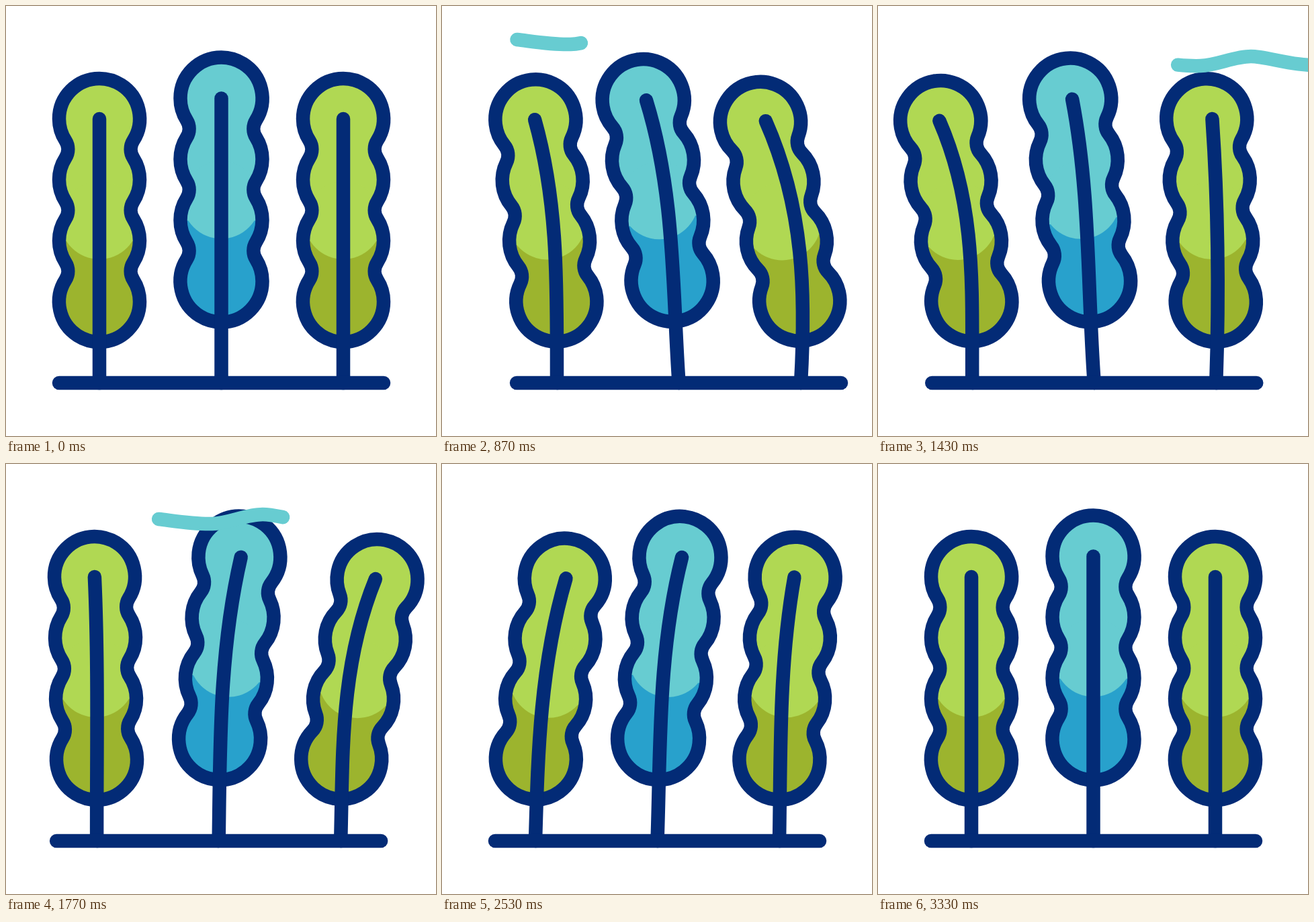
Animation of 640x640 px, one loop 3.43 s. Source, as an HTML page with a canvas:

```html
<!DOCTYPE html>
<html lang="en">
<head>
<meta charset="utf-8">
<title>Trees in the wind</title>
<style>
  html, body { margin: 0; height: 100%; overflow: hidden; background: #fff; }
  canvas { display: block; }
</style>
</head>
<body>
<canvas id="stage" width="640" height="640"></canvas>
<script>
const ctx = document.getElementById('stage').getContext('2d');
const LOOP = 3430, NAVY = '#032b76', TEAL = '#67ccd1';
const GROUND_Y = 561, STEP = 90.7, HEIGHT = 3 * STEP;
const WIND = new Path2D('M0 0C25 3 55 8 80 7S130-7 155-7S220 9 267 6');
const WIND_LENGTH = 272;

// Factors come in pairs: [leaning left, leaning right].
// low and high bend the trunk, top and drag move its tip; low, high and drag follow late.
const trees = [
  { x: 139, y: 440, r: 60, light: '#b0d853', dark: '#9cb42e',
    lean: [[270, 0], [1310, -50], [2270, 50], [3333, 0]],
    slide: [.02, .02], top: [1.06, 1.06], drag: [0, 0],
    low: [.02, .08], high: [-.16, .15] },
  { x: 320.5, y: 409.5, r: 61, light: TEAL, dark: '#28a1cc',
    lean: [[130, 0], [1150, -52], [2050, 52], [3190, 0]],
    slide: [.23, .05], top: [1.13, 1.13], drag: [0, 0],
    low: [.26, .13], high: [.14, .02] },
  { x: 502, y: 440, r: 60, light: '#b0d853', dark: '#9cb42e',
    lean: [[0, 0], [1080, -64], [1870, 58], [3040, 0]],
    slide: [.03, .02], top: [1.2, .97], drag: [-.33, 0],
    low: [-.14, .08], high: [-.1, -.03] }
];
const groundShift = [[0, 0], [667, 36], [1667, -4], [2500, 0]];

// Sine-eased value between key points [time, value].
function track(keys, t) {
  if (t <= keys[0][0]) return keys[0][1];
  for (let i = 1; i < keys.length; i++) {
    const [t0, v0] = keys[i - 1], [t1, v1] = keys[i];
    if (t < t1) return v0 + (v1 - v0) * (1 - Math.cos(Math.PI * (t - t0) / (t1 - t0))) / 2;
  }
  return keys[keys.length - 1][1];
}

const scaled = (value, pair) => value * pair[value < 0 ? 0 : 1];

// Four stacked lobes joined by fillets, centred on the lowest lobe.
function leafPath(r) {
  const fillet = 24, half = STEP / 2;
  const reach = Math.sqrt((r + fillet) ** 2 - half ** 2);
  const a = Math.atan2(half, reach);
  const side = new Path2D();
  for (let k = 0; k < 4; k++) {
    side.arc(0, -STEP * k, r, k ? a : Math.PI / 2, k < 3 ? -a : -Math.PI / 2, true);
    if (k < 3) side.arc(reach, -STEP * k - half, fillet, Math.PI - a, Math.PI + a);
  }
  const leaf = new Path2D(side);
  leaf.addPath(side, new DOMMatrix([-1, 0, 0, -1, 0, -HEIGHT]));
  return leaf;
}
trees.forEach(tree => tree.leaf = leafPath(tree.r));

function drawLeaf(tree, x, lean) {
  ctx.save();
  ctx.translate(x + scaled(lean, tree.slide), tree.y - lean * lean * .0004);
  ctx.rotate(Math.asin(lean / HEIGHT));
  ctx.save();
  ctx.clip(tree.leaf);
  ctx.fillStyle = tree.dark;
  ctx.fillRect(-80, -400, 160, 500);
  ctx.fillStyle = tree.light;
  ctx.fillRect(-80, -400, 160, 310);
  ctx.beginPath();
  ctx.arc(0, -121, 58, 0, Math.PI * 2);
  ctx.fill();
  ctx.restore();
  ctx.stroke(tree.leaf);
  ctx.restore();
}

function drawTree(tree, t, shift) {
  const x = tree.x + shift;
  const lean = track(tree.lean, t), late = track(tree.lean, t - 80);
  drawLeaf(tree, x, lean);
  const top = scaled(lean, tree.top) + scaled(late, tree.drag);
  const topY = tree.y - HEIGHT + top * top * .0012;
  const third = (GROUND_Y - topY) / 3;
  ctx.beginPath();
  ctx.moveTo(x, GROUND_Y);
  ctx.bezierCurveTo(x + scaled(late, tree.low), GROUND_Y - third,
    x + scaled(late, tree.high), topY + third, x + top, topY);
  ctx.stroke();
}

function drawWind(t, y) {
  if (t < 0 || t > 1140) return;
  const head = WIND_LENGTH * Math.max(0, 1 - t / 375);
  const p = Math.max(0, (t - 460) / 690);
  const tail = WIND_LENGTH * (1 - p) ** 1.15;
  if (tail <= head) return;
  ctx.save();
  ctx.translate(217 - 380 * Math.sin((t - 670) * .0014), y);
  ctx.strokeStyle = TEAL;
  ctx.setLineDash([tail - head, 1000]);
  ctx.lineDashOffset = -head;
  ctx.stroke(WIND);
  ctx.restore();
}

function draw(t) {
  ctx.fillStyle = '#fff';
  ctx.fillRect(0, 0, 640, 640);
  ctx.strokeStyle = NAVY;
  ctx.lineWidth = 20.5;
  ctx.lineCap = ctx.lineJoin = 'round';
  const shift = track(groundShift, t);
  trees.forEach(tree => drawTree(tree, t, shift));
  ctx.beginPath();
  ctx.moveTo(79 + shift, GROUND_Y);
  ctx.lineTo(562 + shift, GROUND_Y);
  ctx.stroke();
  drawWind(t, 50);
  drawWind(t - 1120, 82);
}

const start = performance.now();
function tick() {
  draw((performance.now() - start) % LOOP);
  requestAnimationFrame(tick);
}
tick();
</script>
</body>
</html>
```
